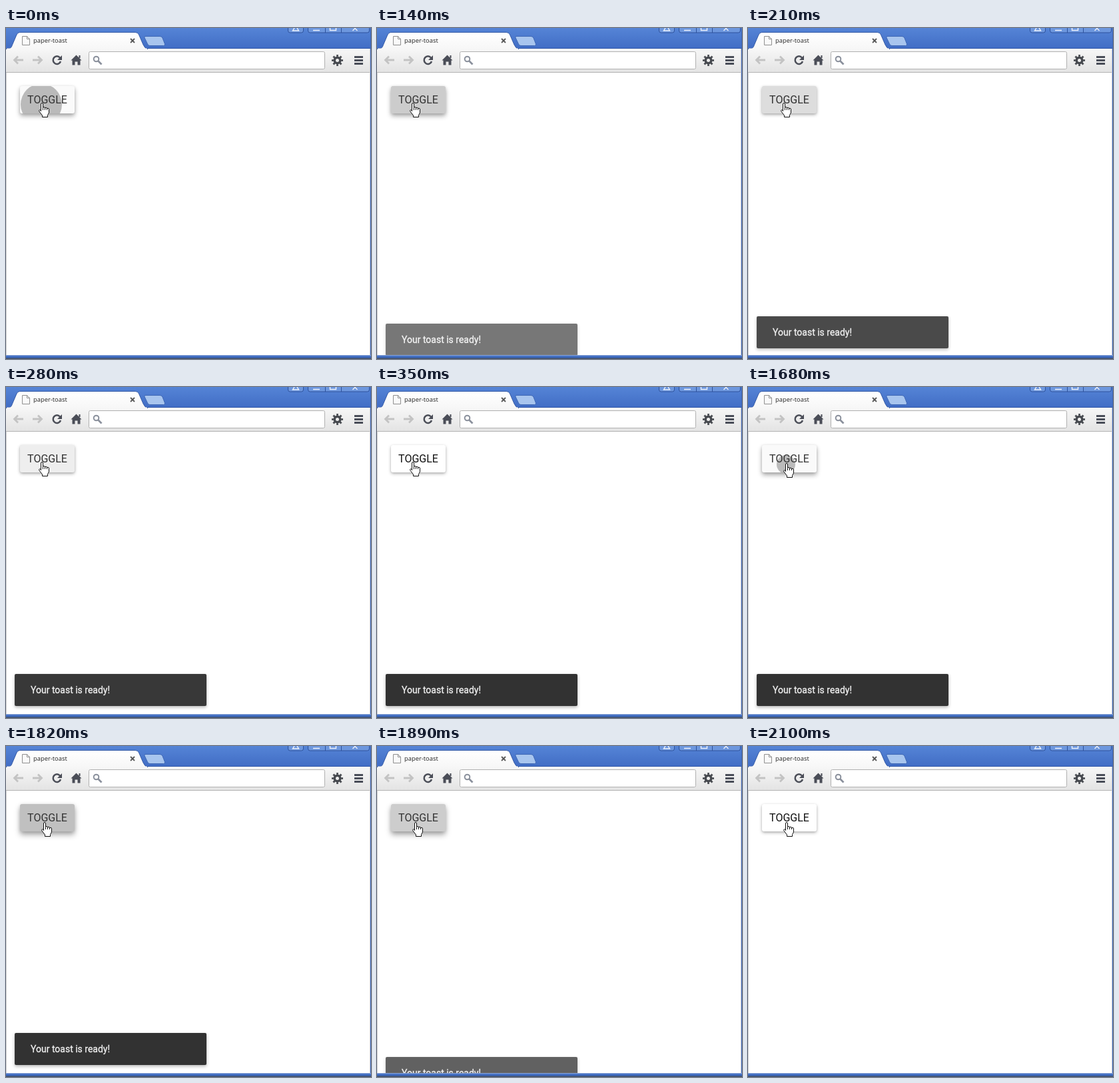
An HTML page for the animation above (3.08 s loop, 548 by 496 pixels).

```html
<!DOCTYPE html>
<html lang="en">
<head>
<meta charset="utf-8">
<title>paper-toast</title>
<style>
  html, body { margin: 0; width: 100%; height: 100%; overflow: hidden; background: #fff; }
  .stage { position: relative; width: 548px; height: 496px; overflow: hidden; font-family: Roboto, sans-serif; }
  .stage > * { position: absolute; }
  .chrome { left: 0; top: 0; }
  .page { left: 1px; top: 67px; width: 545px; height: 423px; overflow: hidden; }
  .page > * { position: absolute; }

  /* every animated part changes in hard 70 ms steps of one 3080 ms loop */
  .button, .ripple, .toast, .cursor { animation: 3080ms step-end infinite; }

  .button {
    left: 20px; top: 20px; width: 82px; height: 41px; border-radius: 3px;
    font-size: 16px; line-height: 41px; text-align: center;
    animation-name: press;
  }
  .button span { position: relative; }
  .ripple {
    position: absolute; inset: 0; border-radius: 3px; background: #000;
    animation-name: ripple;
  }
  .toast {
    left: 12px; top: 363px; width: 264px; height: 48px; padding-left: 24px; border-radius: 2px;
    background: #323232; color: #f1f1f1; font-size: 14px; line-height: 48px;
    -webkit-text-stroke: .3px #f1f1f1;
    box-shadow: 0 2px 5px rgba(0, 0, 0, .3);
    animation-name: toast;
  }
  .cursor { left: 49px; top: 112px; overflow: visible; animation-name: cursor; }

  @keyframes press {
    0%, 54.54% {
      background: #fafafa; color: #333;
      box-shadow: 0 4px 7px rgba(0, 0, 0, .32), 0 1px 4px rgba(0, 0, 0, .12);
    }
    6.81%, 63.63% {
      background: #fff; color: #303030;
      box-shadow: 0 2px 5px rgba(0, 0, 0, .3), 0 1px 3px rgba(0, 0, 0, .1);
    }
    59.09% {
      background: #fafafa; color: #333;
      box-shadow: 0 5px 9px rgba(0, 0, 0, .34), 0 1px 5px rgba(0, 0, 0, .12);
    }
    11.36%, 68.18%, 100% {
      background: #fff; color: #111;
      box-shadow: 0 2px 5px rgba(0, 0, 0, .28), 0 1px 3px rgba(0, 0, 0, .1);
    }
  }
  @keyframes ripple {
    0%     { opacity: .255; clip-path: circle(31px at 32px 27.5px); }
    2.27%  { opacity: .235; clip-path: circle(49px at 34px 25px); }
    4.54%  { opacity: .185; clip-path: circle(80px at 36px 24px); }
    6.81%  { opacity: .137; clip-path: circle(80px at 36px 24px); }
    9.09%  { opacity: .07;  clip-path: circle(80px at 36px 24px); }
    11.36% { opacity: 0;    clip-path: circle(0 at 36px 29px); }
    54.54% { opacity: .255; clip-path: circle(14px at 36px 29px); }
    56.81% { opacity: .25;  clip-path: circle(34px at 37px 27px); }
    59.09% { opacity: .235; clip-path: circle(52px at 37px 24px); }
    61.36% { opacity: .184; clip-path: circle(80px at 37px 24px); }
    63.63% { opacity: .125; clip-path: circle(80px at 37px 24px); }
    65.9%  { opacity: .06;  clip-path: circle(80px at 37px 24px); }
    68.18%, 100% { opacity: 0; clip-path: circle(0 at 36px 29px); }
  }
  @keyframes toast {
    0%     { opacity: 0;   transform: translateY(100px); }
    2.27%  { opacity: .3;  transform: translateY(54px); }
    4.54%  { opacity: .66; transform: translateY(13px); }
    6.81%  { opacity: .88; transform: translateY(2px); }
    9.09%  { opacity: .97; transform: none; }
    11.36% { opacity: 1;   transform: none; }
    61.36% { opacity: .77; transform: translateY(36px); }
    63.63% { opacity: .4;  transform: translateY(75px); }
    65.9%, 100% { opacity: 0; transform: translateY(100px); }
  }
  @keyframes cursor {
    0%     { transform: none; }
    45.45% { transform: translate(1px, 0); }
    47.72%, 100% { transform: translate(4px, 2px); }
  }
</style>
</head>
<body>
<div class="stage">
  <svg class="chrome" width="548" height="496" viewBox="0 0 548 496">
    <defs>
      <linearGradient id="title" x2="0" y2="1">
        <stop stop-color="#5584d6"/><stop offset="1" stop-color="#416dc5"/>
      </linearGradient>
      <linearGradient id="tab" x2="0" y2="1">
        <stop stop-color="#fff"/><stop offset="1" stop-color="#f7f7f7"/>
      </linearGradient>
      <linearGradient id="bar" x2="0" y2="1">
        <stop stop-color="#f7f7f7"/><stop offset="1" stop-color="#e3e3e3"/>
      </linearGradient>
      <path id="arrow" d="M18 42.5 12.5 48l5.5 5.5M13 48H26" fill="none" stroke="#c3c3c3" stroke-width="2.8"/>
    </defs>

    <!-- window frame -->
    <rect width="548" height="31" fill="url(#title)"/>
    <path d="M0 30.5H548" stroke="#3158a8"/>
    <rect y="31" width="548" height="36" fill="url(#bar)"/>
    <path d="M0 66.5H548" stroke="#b4b4b4"/>
    <path d="M.5 67V490" stroke="#d0d0d0"/>
    <path d="M546.5 31V490" stroke="#c8ccd4"/>
    <path d="M547.5 0V496" stroke="#3a62b2"/>
    <rect y="490" width="548" height="6" fill="#4470c3"/>
    <path d="M0 490.5H548" stroke="#8ba6d8"/>
    <path d="M0 494.5H548" stroke="#28477f"/>
    <path d="M0 495.5H548" stroke="#59616f"/>

    <!-- window buttons -->
    <g fill="#6d97de" stroke="#2d519c">
      <path d="M423.500 -1V4q0 3 3 3H443.500q3 0 3-3V-1"/>
      <path d="M453.500 -1V4q0 3 3 3H542.500q3 0 3-3V-1M479.500 0V7M503.500 0V7"/>
    </g>
    <g fill="none" stroke="#eef3fc" stroke-width="1.4">
      <path d="M433 0 430.500 4H439.500L437 0M461 3.500H471M486.500 0V3.500H495.500V0M520.500 4 524 .500 527.500 4"/>
    </g>

    <!-- tabs -->
    <path d="M0 31.500C8 31 8 29 10 24L16 10Q17.500 6.500 21 6.500H194Q198 6.500 199.500 10L206 25Q208.500 31 213 31.500Z" fill="url(#tab)" stroke="#3359a6"/>
    <path d="M1 31.500H212" stroke="#f7f7f7" stroke-width="2"/>
    <path d="M209 12.500H231Q234 12.500 235 15L238.500 24Q239 26.500 236.500 26.500H216Q213.500 26.500 212.500 24L208 14.500Q207.500 12.500 209 12.500Z" fill="#a8c5ee" stroke="#3e67b4"/>
    <path d="M24.500 12.500H31.500L35.500 16.500V25.500H24.500ZM31.500 12.500V16.500H35.500" fill="#fafafa" stroke="#8f8f8f"/>
    <text x="41" y="22" font-family="Open Sans, sans-serif" font-size="9.4" fill="#222">paper-toast</text>
    <path d="M187 16 193 22M193 16 187 22" stroke="#555" stroke-width="1.8"/>

    <!-- toolbar -->
    <use href="#arrow"/>
    <use href="#arrow" transform="matrix(-1 0 0 1 66 0)"/>
    <path d="M81 44.500A5.800 5.800 0 1 0 82 50" fill="none" stroke="#4a4d57" stroke-width="2.5"/>
    <path d="M84 41V48H77Z" fill="#4a4d57"/>
    <path d="M105.500 40.500 113.500 48.500H111.500V55.500H107.500V50.500H103.500V55.500H99.500V48.500H97.500ZM109.500 41H111.500V45H109.500Z" fill="#4a4d57"/>
    <rect x="124.500" y="35.500" width="354" height="26" rx="2" fill="#fff" stroke="#b0b0b0"/>
    <circle cx="135.500" cy="46.500" r="3.800" fill="none" stroke="#8a909c" stroke-width="2"/>
    <path d="M138.500 49.500 143.500 54.500" stroke="#8a909c" stroke-width="2.600"/>
    <g fill="none" stroke="#46494f">
      <circle cx="497.500" cy="48.500" r="4.300" stroke-width="3.600"/>
      <circle cx="497.500" cy="48.500" r="7" stroke-width="3" pathLength="16" stroke-dasharray="1" stroke-dashoffset=".5"/>
    </g>
    <path d="M523 43.500H536M523 48.500H536M523 53.500H536" stroke="#4a4e59" stroke-width="3"/>
  </svg>

  <div class="page">
    <div class="button"><div class="ripple"></div><span>TOGGLE</span></div>
    <div class="toast">Your toast is ready!</div>
  </div>

  <svg class="cursor" width="17" height="23">
    <path d="M3.500 12.500V2Q3.500 .500 5 .500T6.500 2V7.500Q6.500 6.500 8 6.500T9.500 8.200Q9.500 7.200 11 7.200T12.500 9Q12.500 8.300 14 8.300T15.500 10V15L13.500 18.500V21.500H5.500V19L.800 12.800Q.200 11 1.800 10.600 2.700 10.700 3.500 12.500ZM6.500 7.500V11M9.500 8V11M12.500 9V11" fill="#fff" stroke="#111"/>
  </svg>
</div>
</body>
</html>
```
